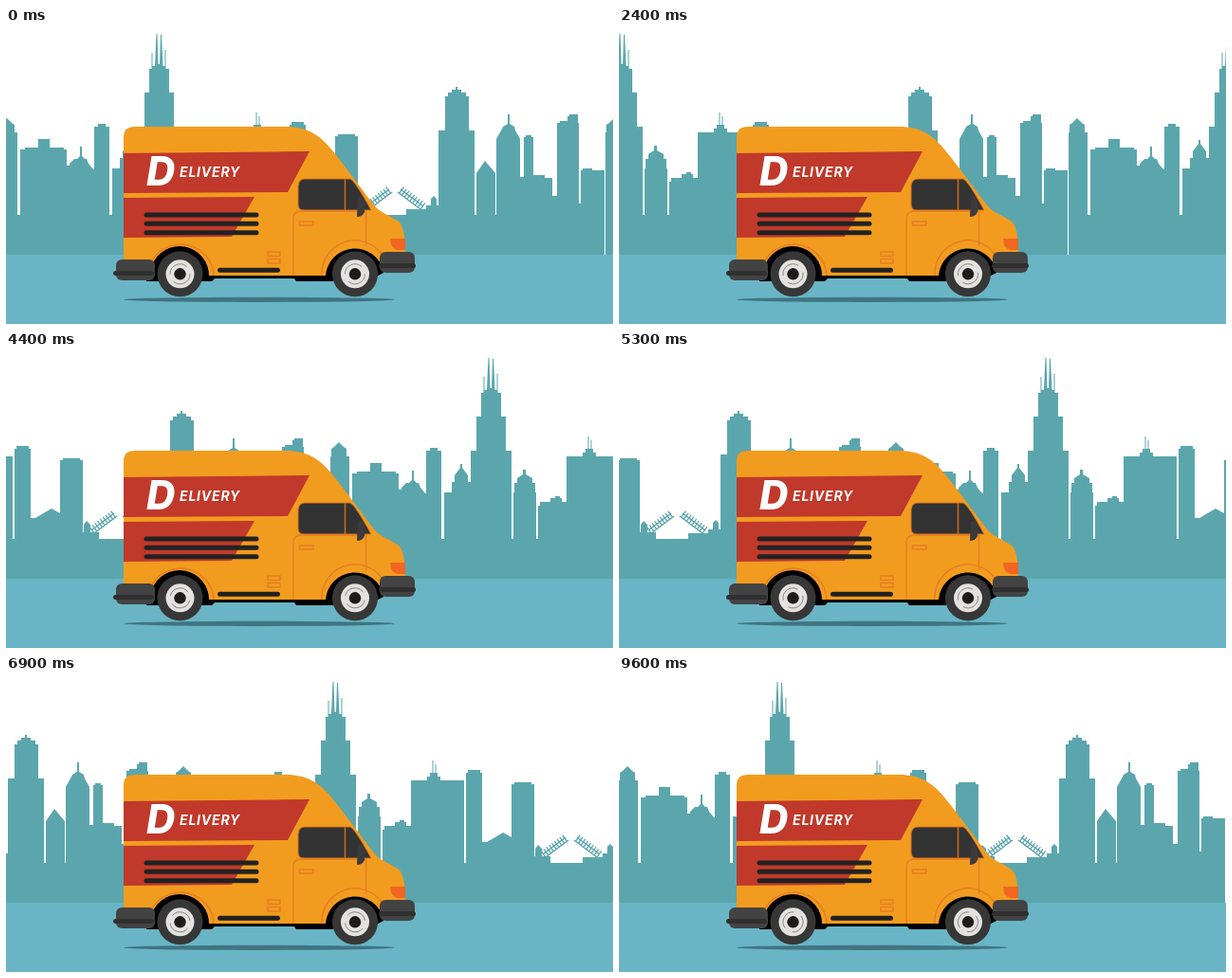
An HTML page that plays this animation: 640 px wide and 312 px high, repeating every 9700 ms.

```html
<!DOCTYPE html>
<html lang="en">
<head>
<meta charset="utf-8">
<title>Delivery van</title>
<style>
  html, body { margin: 0; height: 100%; overflow: hidden; background: #fff; }
  svg { display: block; width: 100vw; height: 100vh; }
  text { font-family: Inter, sans-serif; font-style: italic; fill: #fff; }
  .trim { fill: none; stroke: #e67e22; stroke-width: 1.5; }
  .slot { fill: none; stroke: #222; stroke-width: 5; stroke-linecap: round; }
</style>
</head>
<body>
<svg viewBox="0 0 640 312">
  <defs>
    <g id="leaf" fill="none" stroke="#5ba6ad">
      <path d="M392 191L416 173M389 188L413 170" stroke-width="1.5"/>
      <path d="M389 188L414 169.5" stroke-width="8" stroke-dasharray="1.3 2.2"/>
    </g>
    <g id="city" fill="#5ba6ad">
      <path d="M1 197H640V239H1Z"/>
      <path d="M1 198V110H2V102L5 100L10 95L15 100L18 102V110H21V198Z
        M24 198V128H29V126H43V117H55V126H70V128H73V145H76V143L81 138H84L87 135V125H89V135L92 138H94L96 143L101 149H102V104H106V101H114V104H118V198Z
        M121 198V148H129V137H132V130L135 126L138 122V118H140V122L143 126L146 130V137H149V104H155V68H160V43H162.5V26H163.5V40H166L167.5 6H168.5L169.5 38H171L172 7H173L174.5 40H176.5V23H177.5V43H181V68H186V104H192V198Z"/>
      <path d="M194 198V148H195V138H198V133L204 129V124H207V129L214 133V138H217V148H218V198Z
        M220 198V162H222V158H233V154H238V152H243V154H245V158H250V110H267V106H270V102H272.5V89H273.5V102H275.5V93H276.5V102H278V106H281V110H306V198Z
        M308 198V102H310V99H323V102H325V175H330L347 165L356 170V114H359V112H377V114H380V190H381V182L384 178L388 182V190H397V198Z
        M431 198V191H452V187H457V180L460 177L463 180V187H465V108H472V72H475V68H479V65H483V62H485V65H489V68H494V72H497V108H503V198Z"/>
      <path d="M505 198V153L514 140L525 153V198Z
        M526 198V117L531 108L533 104L538 101V91H540V101L545 104L546 108L551 117V198Z
        M551 198V157H555V115H557V113H563V115H565V155H577V158H585V177H590V100H593V98H601V93H603V91H612V100H613V185H615V150H617V148H627V150H640V198Z"/>
      <use href="#leaf"/>
      <use href="#leaf" transform="translate(838) scale(-1 1)"/>
    </g>
    <g id="wheel">
      <circle r="24" fill="#373737"/>
      <circle r="15" fill="#e4e2de"/>
      <g class="spin" fill="none" stroke="#777" stroke-width=".8">
        <path d="M-10.5 0A10.5 10.5 0 0 1 7 -7.8M10.5 0A10.5 10.5 0 0 1 -7 7.8"/>
      </g>
      <circle r="6.2" fill="#1c1c1c"/>
    </g>
  </defs>

  <g id="skyline">
    <use href="#city"/>
    <use href="#city" x="640"/>
  </g>
  <path d="M0 239H640V312H0Z" fill="#69b5c5"/>

  <ellipse cx="267" cy="286.3" rx="143" ry="2.6" fill="#3f7480"/>
  <path d="M148 267L155 226H390L398 250V258L390 262H345V267H306L304 264H220L217 267Z"/>
  <path d="M124 248V115Q124 104 136 104H295C318 104 331 113 344 129C360 149 376 171 389 188C395 195 408 199 414 204Q421 210 421 237L398 248V256
    A31 31 0 0 0 337 261H214A31 31 0 0 0 154 250Z" fill="#f29c1f"/>
  <g fill="#c0392b">
    <path d="M124 132L320 130L297 173L124 174Z"/>
    <path d="M124 179L262 178L238 220L124 221Z"/>
  </g>
  <path class="slot" d="M148 197H264M148 206.3H264M148 215.7H264M225.5 255.3H286.5"/>
  <text x="148" y="166" font-size="42" font-weight="800">D</text>
  <text x="183" y="157" font-size="14" font-weight="700" letter-spacing=".8">ELIVERY</text>

  <g class="trim">
    <path d="M303 261V201Q303 193 311 193H379.5M379.5 193V230M309.5 204H324V208H309.5Z"/>
    <path d="M276 236H289V240.5H276ZM276 243.5H289V248H276Z"/>
    <path d="M154 245A35 35 0 0 1 219 261M333 261A35 35 0 0 1 396 238"/>
  </g>
  <path d="M315 159H363Q368 161 385 192H314Q308 192 308 186V166Q309 159 315 159Z" fill="#333" stroke="#d9741c"/>
  <path d="M357.5 159V192" stroke="#c66a1d" stroke-width="1.6"/>
  <path d="M371 178H376Q379 183 378 194Q376 199 370 199Z" fill="#3b3b3b"/>
  <path d="M405 222H421V234H412Q405 231 405 222Z" fill="#f26522"/>

  <g fill="#434343">
    <rect x="116" y="244" width="41" height="22" rx="6"/>
    <rect x="394" y="236" width="37" height="22" rx="6"/>
  </g>
  <g fill="#303030">
    <rect x="113" y="256" width="43" height="5" rx="2.5"/>
    <rect x="393" y="248" width="39" height="5" rx="2.5"/>
  </g>
  <use href="#wheel" x="183.5" y="259.3"/>
  <use href="#wheel" x="368" y="259.3"/>
</svg>
<script>
  const LOOP = 9700, STEP = 100, TILE = 640, SPEED = 0.0658, START = 9.4;
  const skyline = document.getElementById('skyline');
  const spin = document.querySelector('.spin');

  function draw() {
    const time = Math.floor(performance.now() % LOOP / STEP) * STEP;
    const shift = Math.round(START + time * SPEED) % TILE;
    skyline.setAttribute('transform', `translate(${-shift} 0)`);
    spin.setAttribute('transform', `rotate(${time / LOOP * 3600})`);
    requestAnimationFrame(draw);
  }
  draw();
</script>
</body>
</html>
```
